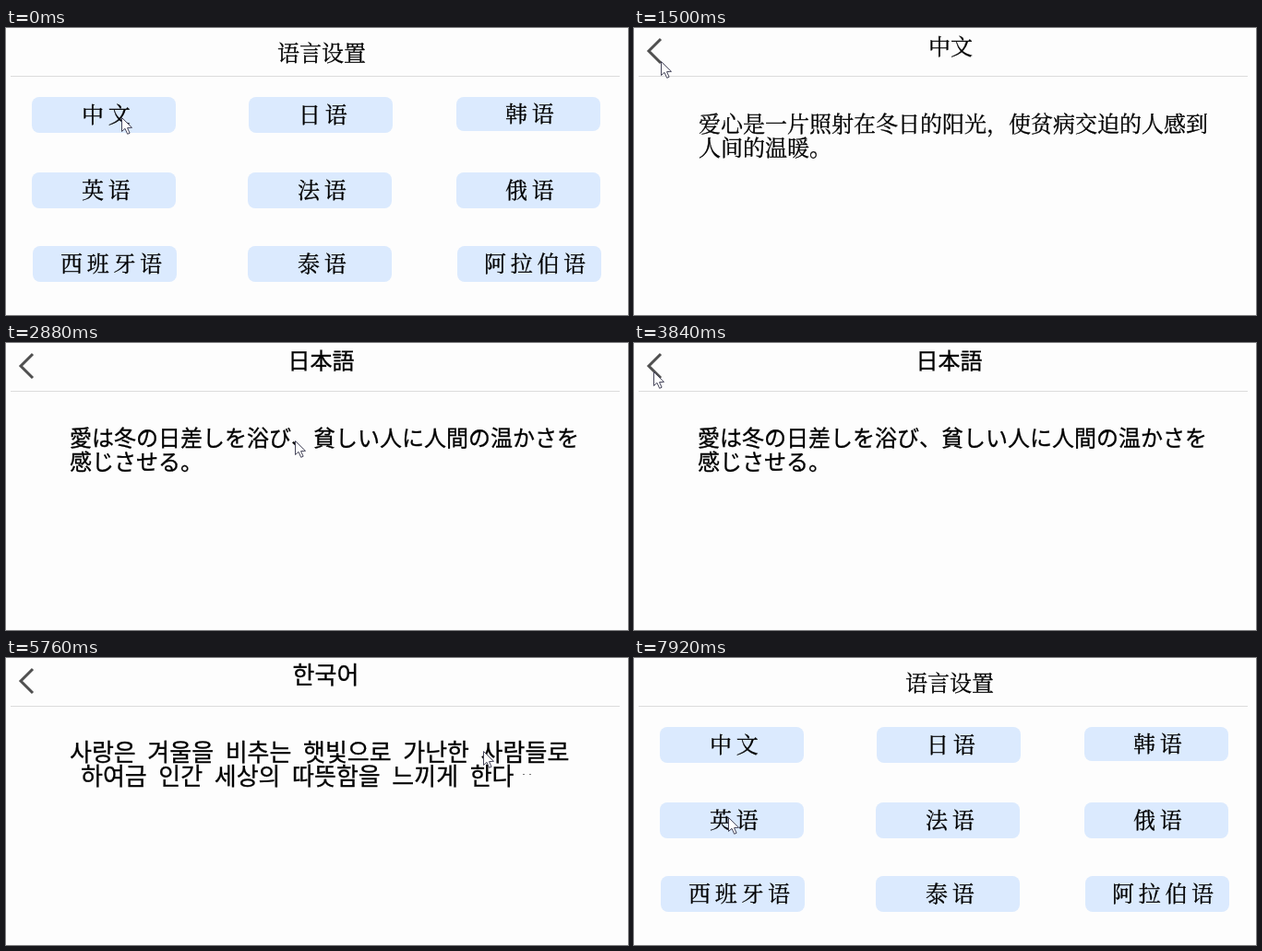
An HTML page that plays this animation: 674 px wide and 312 px high, repeating every 8 s.

```html
<!DOCTYPE html>
<html lang="zh-CN">
<head>
<meta charset="utf-8">
<title>语言设置</title>
<style>
html, body { margin: 0; width: 100%; height: 100%; overflow: hidden; background: #fdfdfd; }
svg { display: block; width: 674px; height: 312px; }
text { font-size: 24px; fill: #000; stroke: #000; stroke-width: .3px; white-space: pre; }
.zh { font-family: "Noto Serif CJK SC", "Noto Sans CJK SC", "Noto Serif", serif; }
.ja { font-family: "Noto Sans CJK JP", "Noto Sans", sans-serif; }
.ko { font-family: "Noto Sans CJK KR", "Noto Sans", sans-serif; font-size: 26px; font-weight: 300; word-spacing: 5.3px; }
.button text { letter-spacing: 4.7px; }
.button rect { fill: #dbeafe; }
</style>
</head>
<body>
<svg id="stage" viewBox="0 0 674 312" xmlns="http://www.w3.org/2000/svg">
  <rect width="674" height="312" fill="#fdfdfd"/>
  <path d="M5 52.5H665" stroke="#dcdcdc"/>
  <g id="pages"></g>
  <path id="cursor" d="M.5.5V15.5L4 12.3 6.7 18.3 9.1 17.2 6.5 11.6 11.5 11.3Z"
        fill="#fff" stroke="#45455a" stroke-linejoin="round"/>
</svg>
<script>
const LOOP = 8000, TICK = 60;
const pagesRoot = document.getElementById('pages');
const cursor = document.getElementById('cursor');

const add = (parent, tag, attrs, content = '') => {
  const node = document.createElementNS('http://www.w3.org/2000/svg', tag);
  for (const key in attrs) node.setAttribute(key, attrs[key]);
  node.textContent = content;
  return parent.appendChild(node);
};

// Distance from the middle of the glyphs down to the baseline.
const baseline = { zh: 9, ja: 8, ko: 8 };

const label = (parent, x, y, content, lang = 'zh') =>
  add(parent, 'text', { x, y: y + baseline[lang], class: lang, lang }, content);

const title = (page, x, y, content, lang) =>
  label(page, x, y, content, lang).setAttribute('text-anchor', 'middle');

function menuPage() {
  const page = add(pagesRoot, 'g', {});
  title(page, 342, 27, '语言设置', 'zh');
  const buttons = [
    ['中文', 28, 75, 82], ['日语', 263, 75, 317], ['韩语', 488, 75, 541],
    ['英语', 28, 157, 82], ['法语', 262, 157, 316], ['俄语', 488, 157, 541],
    ['西班牙语', 29, 237, 59], ['泰语', 262, 237, 316], ['阿拉伯语', 489, 237, 518]
  ];
  for (const [name, x, y, textX] of buttons) {
    const height = name === '韩语' ? 37 : 39;
    const button = add(page, 'g', { class: 'button' });
    add(button, 'rect', { x, y, width: 156, height, rx: 8 });
    label(button, textX, y + Math.floor(height / 2), name);
  }
  return page;
}

function textPage(lang, name, titleX, x, lines, indent = 0) {
  const page = add(pagesRoot, 'g', {});
  add(page, 'path', { d: 'M29 12L16 25L29 38', fill: 'none', stroke: '#505050', 'stroke-width': 3 });
  title(page, titleX, 20, name, lang);
  lines.forEach((line, i) => label(page, x + i * indent, 104 + i * 26, line, lang));
  return page;
}

const menu = menuPage();
const chinese = textPage('zh', '中文', 343, 70,
  ['爱心是一片照射在冬日的阳光，使贫病交迫的人感到', '人间的温暖。']);
const japanese = textPage('ja', '日本語', 341.5, 69,
  ['愛は冬の日差しを浴び、貧しい人に人間の温かさを', '感じさせる。']);
const korean = textPage('ko', '한국어', 346.5, 69,
  ['사랑은 겨울을 비추는 햇빛으로 가난한 사람들로', '하여금 인간 세상의 따뜻함을 느끼게 한다'], 12);
add(korean, 'path', { d: 'M560 126.5h2m5 0h2', stroke: '#777' });

const schedule = [
  [0, menu], [480, chinese], [1980, menu], [2880, japanese],
  [4740, menu], [5760, korean], [7620, menu]
];

// Each move: first and last change, then the points passed after the current one.
const moves = [
  [60, 60, [124, 97]],
  [840, 1500, [154, 129], [29, 36]],
  [2160, 2580, [313, 106]],
  [3240, 3660, [34, 42]],
  [3840, 3840, [21, 31]],
  [4860, 5280, [517, 101]],
  [6060, 6780, [35, 39]],
  [6900, 6960, [31, 36]],
  [7800, 7920, [102, 173]]
];

const ease = p => p * p * (3 - 2 * p);

function along(points, p) {
  const s = p * (points.length - 1);
  const i = Math.min(Math.floor(s), points.length - 2);
  const f = ease(s - i);
  return points[i].map((v, k) => Math.round(v + (points[i + 1][k] - v) * f));
}

function cursorAt(t) {
  let position = [125, 97];
  for (const [start, end, ...points] of moves) {
    if (t < start) break;
    const steps = (end - start) / TICK + 1;
    const step = Math.min(steps, Math.floor((t - start) / TICK) + 1);
    position = along([position, ...points], step / steps);
  }
  return position;
}

// The resting cursor is faint while the Chinese page is fresh.
const cursorOpacity = t => (t >= 480 && t < 840 ? 0.3 : 1);

function render(t) {
  const current = schedule.filter(([start]) => start <= t).pop()[1];
  for (const page of pagesRoot.children) {
    page.setAttribute('visibility', page === current ? 'visible' : 'hidden');
  }
  cursor.setAttribute('transform', `translate(${cursorAt(t)})`);
  cursor.setAttribute('opacity', cursorOpacity(t));
}

function frame() {
  render(performance.now() % LOOP);
  requestAnimationFrame(frame);
}
frame();
</script>
</body>
</html>
```
